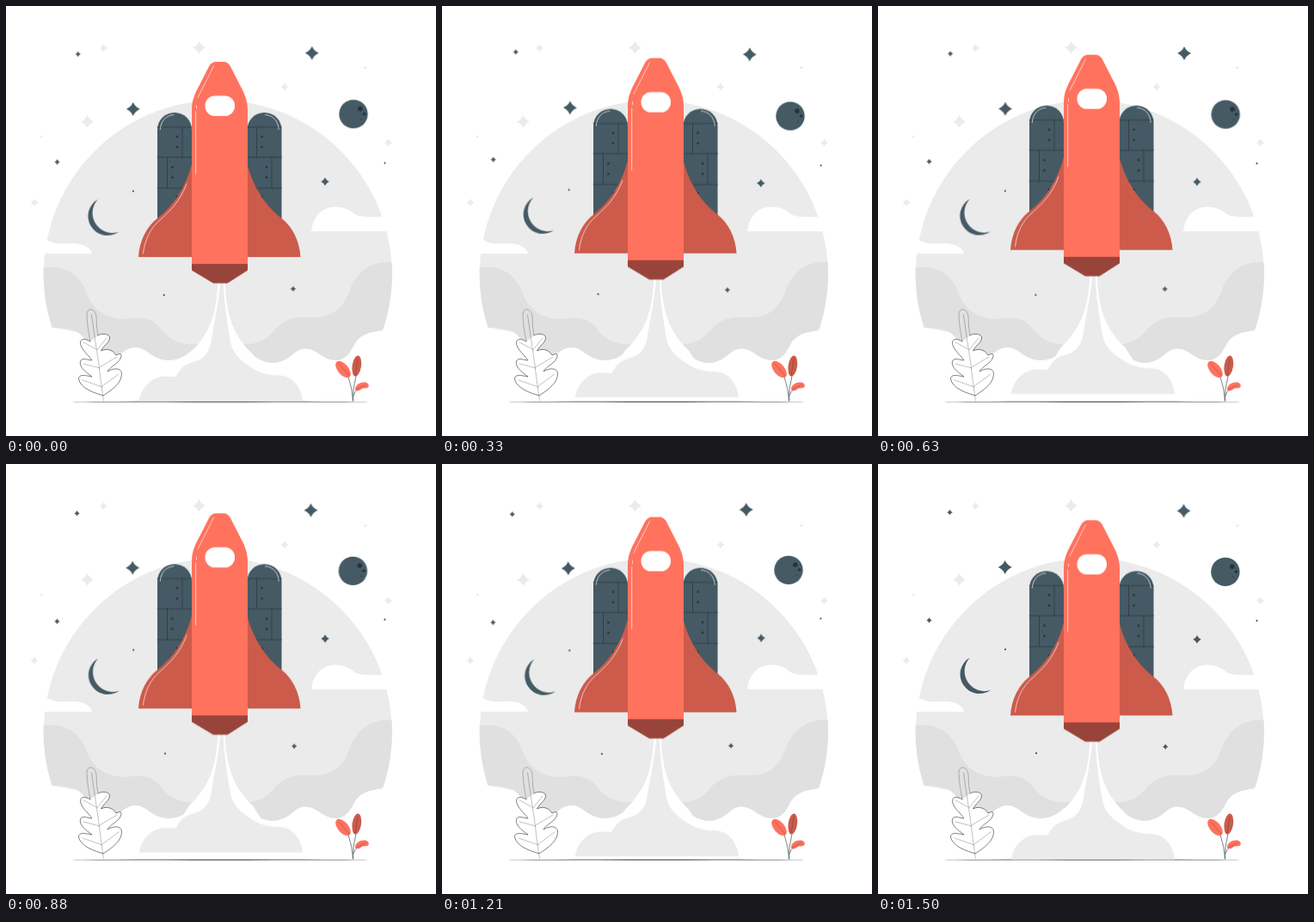
Animation, 500 px wide and 500 px high, one loop 1.54 s. Source, as an HTML page without scripts:

```html
<!DOCTYPE html>
<html lang="en">
<head>
<meta charset="utf-8">
<title>Rocket launch</title>
<style>
  html, body { margin: 0; width: 100%; height: 100%; overflow: hidden; background: #fff; }
  svg { display: block; width: 100%; height: 100%; }

  .rocket { animation: float 1540ms -40ms linear infinite; }
  .sky { transform-origin: 249.5px 192px; animation: sway 1540ms -40ms linear infinite; }
  @keyframes float {
    0%, 100% { transform: translateY(.4px); }
    50% { transform: translateY(-9.6px); }
  }
  @keyframes sway {
    0%, 100% { transform: rotate(0deg); }
    25% { transform: rotate(1deg); }
    75% { transform: rotate(-1deg); }
  }

  .pale { fill: #ebebeb; }
  .shade { fill: #e0e0e0; }
  .white { fill: #fff; }
  .slate { fill: #455a64; }
  .ink { fill: #263238; }
  .coral { fill: #ff725e; }
  .rust { fill: #cc5b4b; }
  .nozzle { fill: #99443a; }
  .line { fill: none; stroke: #263238; stroke-width: .6; stroke-linecap: round; stroke-linejoin: round; }
  .faint { stroke-opacity: .5; }
  .shine { fill: none; stroke: #fff; stroke-width: .65; stroke-linecap: round; }
</style>
</head>
<body>
<svg viewBox="0 0 500 500">
  <defs>
    <path id="star" d="M0-1Q.3-.3 1 0Q.3.3 0 1Q-.3.3-1 0Q-.3-.3 0-1Z"/>
    <g id="side">
      <path class="slate" d="M176 248V144A20 20 0 0 1 216 144V248Z"/>
      <path class="line" d="M176 141H216M176 176H216M176 212H216M205 141V176M187.500 176V212"/>
      <g class="ink">
        <circle cx="199" cy="152" r="1.300"/>
        <circle cx="199" cy="164" r="1.300"/>
        <circle cx="193.500" cy="187.500" r="1.300"/>
        <circle cx="193.500" cy="199.500" r="1.300"/>
        <circle cx="199" cy="222" r="1.300"/>
      </g>
      <path class="shine" d="M179.300 143.500C180 134 186 127 195 126.600"/>
      <path class="rust" d="M216.500 182C209 212 194 233 176 247C164 256 155 273 154 292H216.500Z"/>
    </g>
  </defs>

  <!-- Backdrop -->
  <path class="pale" d="M53.500 374A202.500 202.500 0 1 1 438 377L300 400H205Z"/>
  <path class="shade" d="M43.700 304C68 301 85 311 93 332C100 352 114 364 140 364C162 360 174 365 183 379C193 390 207 395 223 393C213 405 203 412 188 412C168 411 165 397 150 397C136 398 134 409 119 410C101 411 98 398 91 387C84 376 70 374 53.500 374A202.500 202.500 0 0 1 43.700 304Z"/>
  <path class="shade" d="M448.500 298C426 296 408 308 400 330C392 352 380 364 351 362C333 360 320 367 311 378C302 389 291 394 275 393C284 407 298 415 311 415C331 414 335 398 348 398.500C363 399 368 412 384 412C400 411 402 396 409 388C417 380 427 379 438 377A202.500 202.500 0 0 0 448.500 298Z"/>
  <path class="white" d="M40 270L48 272C57 278 66 276 77 276C89 276 98 280 100 288H40Z"/>
  <path class="white" d="M355 262C357 244 368 234 382 233.500C393 233.500 400 237 405 242C413 246 427 245.500 440 245L450 262Z"/>

  <g class="pale">
    <use href="#star" transform="translate(224.500 48.500) scale(7.500)"/>
    <use href="#star" transform="translate(113.500 49) scale(4.500)"/>
    <use href="#star" transform="translate(324 94) scale(4.500)"/>
    <use href="#star" transform="translate(94.500 134.500) scale(7.500)"/>
    <use href="#star" transform="translate(33 228.500) scale(4.500)"/>
    <use href="#star" transform="translate(444.500 159) scale(4.500)"/>
    <use href="#star" transform="translate(418 71.500) scale(2.300)"/>
    <use href="#star" transform="translate(41 152) scale(2)"/>
  </g>

  <g class="sky slate">
    <use href="#star" transform="translate(355.500 54.500) scale(8)"/>
    <use href="#star" transform="translate(147.700 120) scale(8)"/>
    <use href="#star" transform="translate(83.500 56.300) scale(3.200)"/>
    <use href="#star" transform="translate(59.500 181.700) scale(3.200)"/>
    <use href="#star" transform="translate(371 204) scale(4.700)"/>
    <use href="#star" transform="translate(334.200 328.700) scale(3.200)"/>
    <g class="ink">
      <circle cx="148" cy="215.500" r="1"/>
      <circle cx="184" cy="336.300" r="1"/>
      <circle cx="440.500" cy="182.200" r="1"/>
    </g>
    <path d="M107 225A22.500 22.500 0 1 0 131 263A23.200 23.200 0 0 1 107 225Z"/>
    <circle cx="403.900" cy="125.400" r="16.700"/>
    <g class="ink">
      <circle cx="411.800" cy="119.200" r="2.700"/>
      <circle cx="416.500" cy="125.300" r="1.700"/>
      <circle cx="413" cy="131.500" r=".7"/>
    </g>
  </g>

  <ellipse class="ink" cx="249" cy="460.200" rx="172" ry=".45"/>

  <g class="rocket">
    <path class="white" d="M246.500 318C245 352 241 378 213 405L200 425H300L287 405C260 380 256 352 254.500 318Z"/>
    <path class="pale" d="M249.500 318C248 342 242 368 239 388C237 403 230 411 218 414C206 417 202 423 198 430C194 433 188 430 181 431C165 434 156 448 155 459.500H345C344 448 337 433 322 430C315 429 309 430 303 428C293 426 285 421 276 414C266 406 262 398 260.500 388C257 368 253 342 252.500 318Z"/>
    <use href="#side"/>
    <use href="#side" transform="translate(496.500 0) scale(-1 1)"/>
    <path class="shine" d="M210 207C202 228 191 238 179 249C168 258 161 273 159.500 288"/>
    <path class="nozzle" d="M216 299H281V307.500L257.500 322.500H241L216 307.500Z"/>
    <path class="coral" d="M216 300V121C216 110 220 101 225 92L236 70.500Q239 65 244 65H253Q258 65 261 70.500L272 92C277 101 281 110 281 121V300Z"/>
    <path class="shine" d="M241.500 70L223 106.500M221.500 116V119M220.700 123V195"/>
    <rect class="white" x="231.500" y="104.500" width="34.500" height="23.500" rx="11.500"/>
  </g>

  <!-- Plants -->
  <g class="line">
    <path class="white" d="M107 383C111 380 121 381 120.500 386C120 392 114 394 110.500 401C116 398 124 399 128 406Q136 402 133.500 409C130 417 122 418 118 425C124 421 134 420 134.500 427C135 438 124 446 113 453C103 450 87 445 84.500 434C84 427 94 430 100 431C92 425 85 420 86.500 413C89 408 95 412 100 412C95 405 86 398 86.500 391C88 385 94 388 98 390"/>
    <path class="faint" d="M98 390C96 380 94 368 94 358Q95 352 99.500 353Q104 354 105 361Q105 374 107 383"/>
    <path class="faint" d="M99.500 359Q103 385 107 410Q110 436 113.500 459M105 399L90 391M106 400L117 386M109 421L90 416M109 420L129 408M112 443L89 435M112 442L131 428"/>
  </g>
  <path class="line" d="M403.500 459Q403 446 398 431M403.500 459Q403 445 407 430M404 453Q406 446 412 444"/>
  <ellipse class="coral" rx="6.200" ry="11.500" transform="translate(392 422.500) rotate(-40)"/>
  <ellipse class="rust" rx="5.200" ry="12.200" transform="translate(407.800 418.500) rotate(8)"/>
  <path class="coral" d="M406 446C406 440 412 437 418 437.500Q423 439 421.500 443C419 445.500 416 443.500 413 445.500C411 448 407 448 406 446Z"/>
  <path class="line faint" d="M387 416L399 430M409 410L406 430M418 440.500L407 446"/>
</svg>
</body>
</html>
```
